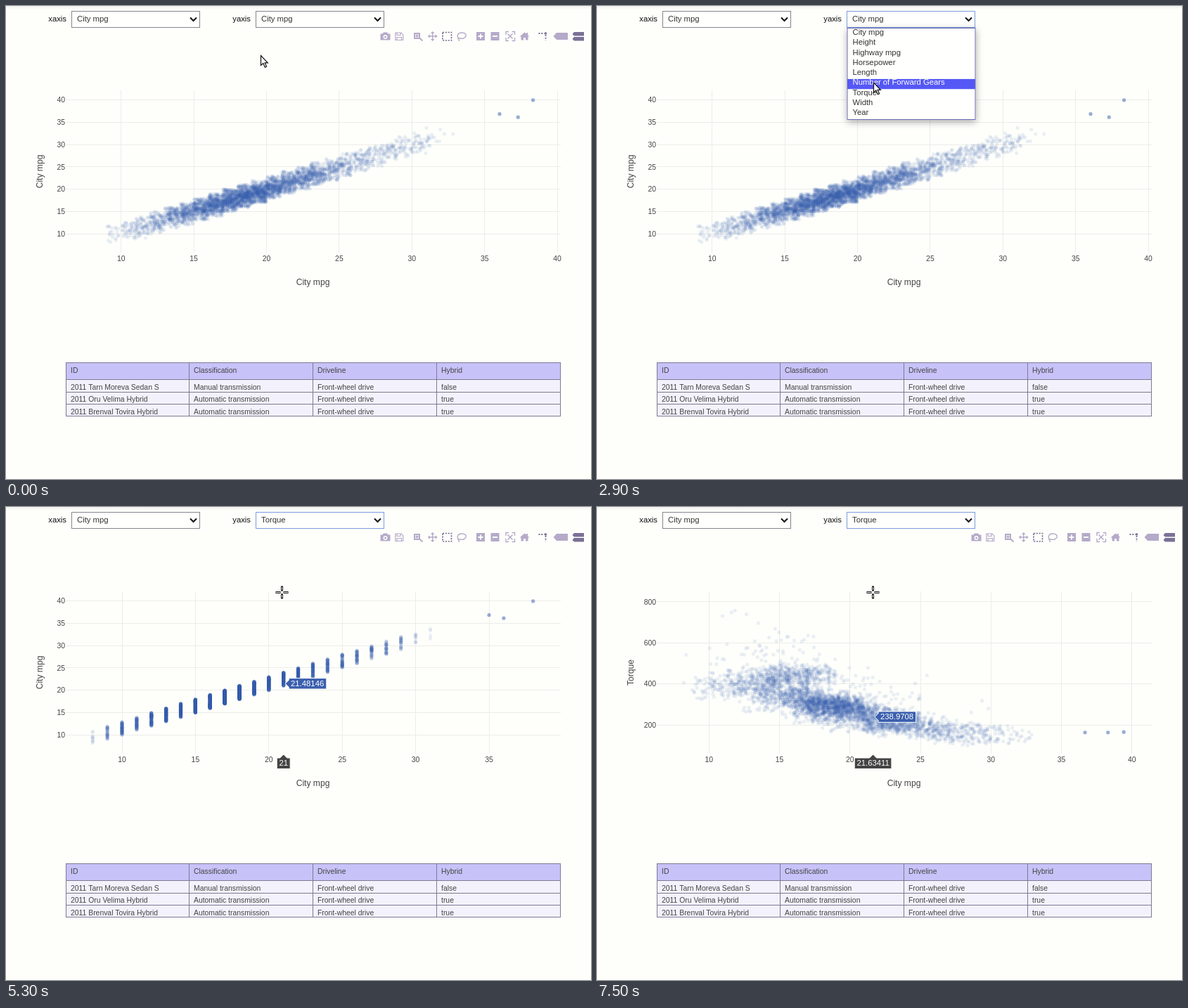
Animation, 832 px wide and 673 px high, one loop 8 s. Source, as an HTML page with a canvas:

```html
<!DOCTYPE html>
<html lang="en">
<head>
<meta charset="utf-8">
<title>Scatter plot with axis menus</title>
<style>
html, body { margin: 0; width: 100%; height: 100%; overflow: hidden; background: #fefffb; }
canvas { display: block; }
</style>
</head>
<body>
<canvas id="stage" width="832" height="673"></canvas>
<script>
const W = 832, H = 673, LOOP = 8000;
const BG = '#fefffb', INK = '#444', BLUE = '#3b5fae', LILAC = '#b5aac9', PLUM = '#7b7096';
const stage = document.getElementById('stage').getContext('2d');
let g = stage;

function text(s, x, y, size = 10.4, color = INK, align = 'left') {
  g.font = `${size}px "Liberation Sans", Arial, sans-serif`;
  g.fillStyle = color;
  g.textAlign = align;
  g.fillText(s, x, y + size * 0.35);
}

function box(x, y, w, h, fill, stroke) {
  if (fill) { g.fillStyle = fill; g.fillRect(x, y, w, h); }
  if (stroke) { g.strokeStyle = stroke; g.lineWidth = 1; g.strokeRect(x, y, w, h); }
}

function shape(d, fill, stroke, width = 1) {
  const path = new Path2D(d);
  if (fill) { g.fillStyle = fill; g.fill(path, 'evenodd'); }
  if (stroke) { g.strokeStyle = stroke; g.lineWidth = width; g.stroke(path); }
}

// Seeded random numbers
let seed = 2011;
function rand() {
  seed = (seed + 0x6d2b79f5) | 0;
  let n = Math.imul(seed ^ (seed >>> 15), 1 | seed);
  n = (n + Math.imul(n ^ (n >>> 7), 61 | n)) ^ n;
  return ((n ^ (n >>> 14)) >>> 0) / 4294967296;
}

// One row per city mpg from 8 up: cars, then torque low, middle, high and outlier top
const spread = [
  [10, 290, 330, 375, 590], [45, 285, 350, 420, 775], [90, 290, 370, 420, 740],
  [90, 290, 340, 400, 755], [150, 220, 370, 450, 740], [260, 220, 385, 460, 580],
  [290, 220, 340, 425, 605], [380, 230, 300, 430, 590], [420, 190, 265, 340, 515],
  [520, 180, 255, 310, 515], [450, 160, 245, 310, 405], [300, 150, 230, 300, 425],
  [260, 135, 200, 250, 425], [240, 125, 175, 240, 370], [220, 130, 175, 220, 400],
  [120, 130, 165, 190, 425], [85, 110, 135, 190, 190], [75, 100, 135, 195, 195],
  [65, 105, 130, 180, 180], [55, 95, 110, 180, 257], [45, 98, 115, 150, 150],
  [35, 95, 110, 150, 150], [9, 100, 115, 130, 236], [4, 125, 128, 130, 235]
];

const cars = [];
spread.forEach(([count, low, mid, high, top], i) => {
  const mpg = i + 8;
  const pool = Array.from({ length: 6 + Math.sqrt(count) | 0 }, () => {
    const u = rand() + rand();
    return u < 1 ? low + (mid - low) * u : mid + (high - mid) * (u - 1);
  });
  const rare = Array.from({ length: 6 }, () => high + (top - high) * rand() ** 1.3);
  for (let n = 0; n < count; n++) {
    const pick = rand();
    let torque = pool[pool.length * rand() ** 1.6 | 0];
    if (pick < 0.05) torque = rare[6 * rand() | 0];
    else if (pick < 0.25 && mpg > 11 && mpg < 17) torque = 395 + 5 * (rand() * 7 | 0);
    cars.push({
      mpg, torque,
      mpgX: mpg + 3 * rand(), mpgY: mpg + 3 * rand(),
      lateX: mpg + 3 * rand(), torqueY: torque + 70 * rand()
    });
  }
});
const picked = [
  { mpg: 35, torque: 154, mpgX: 36.03, mpgY: 36.8, lateX: 36.67, torqueY: 163 },
  { mpg: 36, torque: 154, mpgX: 37.3, mpgY: 36.1, lateX: 38.3, torqueY: 163 },
  { mpg: 38, torque: 112, mpgX: 38.33, mpgY: 39.9, lateX: 39.42, torqueY: 165 }
];

const axis = (first, px, scale, step, last) => ({
  at: v => px + (v - first) * scale,
  ticks: Array.from({ length: (last - first) / step + 1 }, (_, i) => first + i * step)
});
const wideX = axis(10, 163.7, 20.68, 5, 40);
const wholeX = axis(10, 165, 20.88, 5, 35);
const lateX = axis(10, 159.3, 20.05, 5, 40);
const mpgY = axis(10, 324.5, -6.373, 5, 40);
const wholeY = axis(200, 306.5, -0.3008, 200, 800);
const torqueY = axis(200, 310, -0.2917, 200, 800);

const scenes = [
  { from: 0, x: wideX, y: mpgY, keys: ['mpgX', 'mpgY'], title: 'City mpg', hover: [21.06889, 21.48146] },
  { from: 5300, x: wholeX, y: mpgY, keys: ['mpg', 'mpgY'], title: 'City mpg', hover: [21, 21.48146] },
  { from: 6100, x: wholeX, y: wholeY, keys: ['mpg', 'torque'], title: 'City mpg', hover: [21, 174] },
  { from: 6900, x: lateX, y: torqueY, keys: ['lateX', 'torqueY'], title: 'Torque', hover: [21.63411, 238.9708] }
];

function drawPlot({ x, y, keys, title }) {
  for (const v of x.ticks) {
    box(Math.floor(x.at(v)), 120, 1, 231, '#ecede9');
    text(v, x.at(v), 359.5, 10.4, INK, 'center');
  }
  for (const v of y.ticks) {
    box(85, Math.floor(y.at(v)), 704, 1, '#ecede9');
    text(v, 84, y.at(v), 10.4, INK, 'right');
  }
  g.fillStyle = BLUE;
  const dots = (list, alpha) => {
    g.globalAlpha = alpha;
    for (const car of list) {
      g.beginPath();
      g.arc(x.at(car[keys[0]]), y.at(car[keys[1]]), 2.6, 0, 7);
      g.fill();
    }
  };
  dots(cars, 0.1);
  dots(picked, 0.52);
  g.globalAlpha = 1;
  text('City mpg', 436.5, 393, 12.1, INK, 'center');
  g.save();
  g.translate(47.5, 235.5);
  g.rotate(-Math.PI / 2);
  text(title, 0, 0, 12.1, INK, 'center');
  g.restore();
}

function drawTable() {
  const edges = [85.5, 260.5, 436.5, 612.5, 788.5];
  const rows = [
    ['ID', 'Classification', 'Driveline', 'Hybrid'],
    ['2011 Tarn Moreva Sedan S', 'Manual transmission', 'Front-wheel drive', 'false'],
    ['2011 Oru Velima Hybrid', 'Automatic transmission', 'Front-wheel drive', 'true'],
    ['2011 Brenval Tovira Hybrid', 'Automatic transmission', 'Front-wheel drive', 'true']
  ];
  const tops = [507.5, 531.5, 549.5, 566.5, 583.5], middles = [518.5, 542.5, 559.5, 577];
  rows.forEach((row, r) => row.forEach((s, c) => {
    box(edges[c], tops[r], edges[c + 1] - edges[c], tops[r + 1] - tops[r], r ? '#f3f2fc' : '#c7c3f9', '#7c7a92');
    text(s, edges[c] + 6.5, middles[r]);
  }));
}

function drawBackdrop(scene) {
  box(0, 0, W, H, BG);
  const shade = g.createLinearGradient(0, 0, 0, 5);
  shade.addColorStop(0, '#f1f2ee');
  shade.addColorStop(1, BG);
  box(0, 0, W, 5, shade);
  drawPlot(scene);
  drawTable();
}

for (const scene of scenes) {
  scene.image = document.createElement('canvas');
  scene.image.width = W;
  scene.image.height = H;
  g = scene.image.getContext('2d');
  drawBackdrop(scene);
}
g = stage;

function drawSelect(label, x, value, border) {
  text(label, x - 7, 18.5, 11.3, '#111', 'right');
  box(x + 0.5, 7.5, 182, 23, '#fffffd', border);
  text(value, x + 8, 18.5, 11.3, '#333');
  shape(`M${x + 169} 16.5l4.5 4.5 4.5-4.5`, null, '#111', 2);
}

const options = ['City mpg', 'Height', 'Highway mpg', 'Horsepower', 'Length',
  'Number of Forward Gears', 'Torque', 'Width', 'Year'];

function drawMenu(ready, y) {
  g.save();
  g.shadowColor = 'rgba(0,0,0,.32)';
  g.shadowBlur = 10;
  g.shadowOffsetY = 3;
  box(355.5, 31, 183, 131, ready ? '#fffffd' : '#f0f0ed');
  g.restore();
  if (!ready) return;
  const rowTop = 32.4, rowHeight = 14.3;
  const active = Math.max(0, Math.floor((y - rowTop) / rowHeight));
  box(356, rowTop + active * rowHeight, 182, rowHeight, '#5558f5');
  options.forEach((s, i) => text(s, 363.5, 37 + i * rowHeight, 11.3, i === active ? '#fff' : '#333'));
  box(356, 31.5, 182, 130, null, '#6a6bb5');
}

function drawToolbar(alpha) {
  g.globalAlpha = alpha;
  // Camera and disk
  shape('M532.5 39.5h3l1.5-2h5l1.5 2h3v9h-14zM542.5 44a3 3 0 1 0-6 0a3 3 0 1 0 6 0z', LILAC);
  shape('M541 44a1.5 1.5 0 1 0-3 0a1.5 1.5 0 1 0 3 0z', LILAC);
  shape('M553.8 38h8.2l2.7 2.7v7.8h-10.9zM556 38v3.5h5v-3.5M556 48.5v-4h6.5v4', null, LILAC, 1.2);
  // Zoom and pan
  shape('M580 38h9v9h-9zM582 40v5h5v-5z', LILAC);
  shape('M588 45.5l4.5 4M582.5 42.5h4M584.5 40.5v4', null, LILAC, 2);
  shape('M601 43h11.5M606.7 37.3v11.5', null, LILAC, 1.4);
  shape('M599.8 43l3-2.8v5.6zM613.6 43l-3-2.8v5.6zM606.7 36l-2.8 3h5.6zM606.7 50l-2.8-3h5.6z', LILAC);
  // Box and lasso selection
  g.setLineDash([2.2, 1.6]);
  shape('M621 37.5h12.5v11.5h-12.5z', null, PLUM, 1.7);
  g.setLineDash([]);
  shape('M643 45c-2-3 0-7 5-7s7 2 6 5-5 4-8 3-4 0-2.500 1 1 2 .5 3', null, LILAC, 1.4);
  // Zoom in and out
  for (const x of [669, 689.5]) box(x, 37, 12, 12, LILAC);
  shape('M671.5 43h7M675 39.500v7M692 43h7', null, BG, 1.8);
  // Autoscale and home
  shape('M713.5 39.500l7 7M720.500 39.500l-7 7', null, LILAC, 1.5);
  shape('M711 41v-4.500h4M719.500 36.500h4v4.500M723.500 45v4.500h-4M715 49.500h-4v-4.500', null, LILAC, 1.4);
  shape('M730.500 43.500l7-6 2.500 2v-1.500h2v3.300l2.500 2.200h-2v5h-3.500v-3.500h-3v3.500h-3.500v-5z', LILAC);
  // Spike lines
  g.setLineDash([2, 1.8]);
  shape('M757.500 39h8M767.500 41v8', null, PLUM, 1.8);
  g.setLineDash([]);
  shape('M766 37.500h3v3h-3z', PLUM);
  // Hover modes
  shape('M778.500 43l4.500-5h16v10h-16z', LILAC);
  shape('M805.500 40l2.500-3h14v5.500h-14zM805.500 47l2.500-3h14v5.500h-14z', PLUM);
  g.globalAlpha = 1;
}

function drawHover({ x, y, hover }) {
  const [vx, vy] = hover, px = x.at(vx), py = y.at(vy);
  g.font = '11.3px "Liberation Sans", Arial, sans-serif';
  const wx = g.measureText(vx).width, wy = g.measureText(vy).width;
  shape(`M${px + 2.5} ${py}l5-5v-2.700h${wy + 6.500}v15.400h${-wy - 6.500}v-2.700z`, BLUE, BG);
  text(vy, px + 10.4, py - 0.5, 11.3, '#fff');
  const half = wx / 2 + 3.2;
  shape(`M${px} 352l5 5h${half - 5}v15.500h${-2 * half}v-15.500h${half - 5}z`, INK, BG);
  text(vx, px, 364.3, 11.3, '#fff', 'center');
}

function drawArrow(x, y) {
  g.save();
  g.translate(x, y);
  shape('M.5 0v14l3.300-3 2.500 5.700 2.300-1-2.500-5.400h4.200z', '#fff', '#111', 1.2);
  g.restore();
}

function drawCross(x, y) {
  g.save();
  g.translate(x, y);
  for (let i = 0; i < 4; i++) {
    box(2.5, -1, 6, 2, '#fff', '#111');
    g.rotate(Math.PI / 2);
  }
  g.restore();
}

// Time, x, y
const path = [
  [0, 362, 70.5], [700, 362, 70.5], [800, 375, 55], [900, 389, 36], [1000, 400, 19], [1100, 406, 12],
  [2000, 406, 12], [2200, 401, 55], [2400, 397, 84], [2600, 394, 102], [2700, 394, 102],
  [2900, 393, 109], [3500, 393, 121], [8000, 393, 121]
];

function pointer(t) {
  const i = path.findIndex(p => p[0] > t);
  const [t0, x0, y0] = path[i - 1], [t1, x1, y1] = path[i];
  const k = (t - t0) / (t1 - t0);
  return [x0 + (x1 - x0) * k, y0 + (y1 - y0) * k];
}

const clamp = v => Math.max(0, Math.min(1, v));

function draw(now) {
  const t = Math.floor(now % LOOP / 100) * 100;
  const scene = scenes.findLast(s => t >= s.from);
  const [x, y] = pointer(t);
  g.drawImage(scene.image, 0, 0);
  drawSelect('xaxis', 93, 'City mpg', '#85858c');
  drawSelect('yaxis', 355, t < 3900 ? 'City mpg' : 'Torque', t < 2000 ? '#85858c' : '#7b9bdc');
  const bar = t < 2000 ? clamp((1100 - t) / 300) : clamp((t - 4000) / 300);
  if (bar) drawToolbar(bar);
  if (t >= 1500 && t < 3900) drawMenu(t >= 2000, y);
  if (t >= 4100) {
    drawHover(scene);
    drawCross(392.5, 121.5);
  } else drawArrow(x, y);
}

const start = performance.now();
function tick() {
  draw(performance.now() - start);
  requestAnimationFrame(tick);
}
tick();
</script>
</body>
</html>
```
